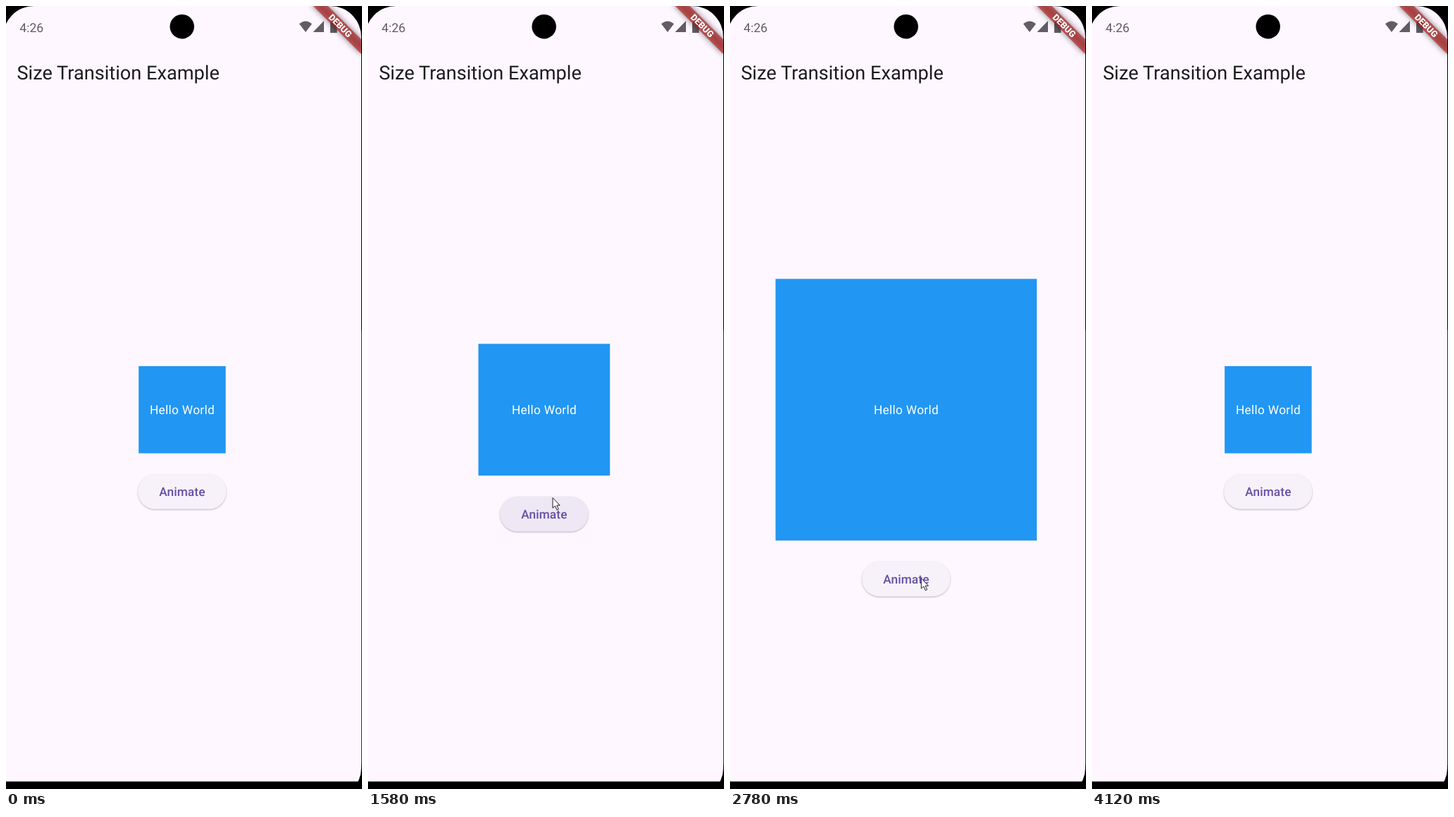
Recreate the animation shown at these times as an HTML page. Size 505 by 1109 pixels, loop 4.19 s.

```html
<!DOCTYPE html>
<html lang="en">
<head>
<meta charset="utf-8">
<title>Size transition</title>
<style>
  html, body { margin: 0; width: 100%; height: 100%; overflow: hidden; background: #000; }
  svg { display: block; width: 505px; height: 1109px; }
  text { font-family: Roboto, sans-serif; text-rendering: geometricPrecision; }
  .mid { text-anchor: middle; }
  .status { fill: #625d64; }
  .pill { x: 187.2px; y: -24.7px; width: 125.2px; height: 49.4px; rx: 24.7px; }
  .ribbon { x: -49.4px; y: 34.57px; width: 98.8px; height: 14.81px; }
  #face { filter: drop-shadow(0 1.3px 1px rgba(0, 0, 0, .27)); }
</style>
</head>
<body>
<svg viewBox="0 0 505 1109">
  <defs>
    <clipPath id="screen"><rect x="-4.2" width="508.2" height="1123" rx="44"/></clipPath>
    <filter id="soft" x="-30%" y="-200%" width="160%" height="500%"><feGaussianBlur stdDeviation="4.5"/></filter>
  </defs>
  <rect width="505" height="1109"/>
  <rect x="504" y="459" width="1" height="616" fill="#33292e"/>

  <g clip-path="url(#screen)">
    <rect x="-5" width="510" height="1109" fill="#fef7ff"/>
    <g class="status">
      <text x="19.3" y="36.5" font-size="17.6">4:26</text>
      <path d="M416 25.2Q425 17.6 434 25.2L425 37Z"/>
      <path d="M451 21V37H435.5Z"/>
      <path d="M460 22.5h2.8v-2h4v2h2.8V38H460Z"/>
    </g>
    <text x="15.5" y="103.5" font-size="27.16" fill="#1d1b20">Size Transition Example</text>

    <rect id="box" fill="#2196f3"/>
    <text class="mid" x="250" y="578" font-size="17.28" letter-spacing=".309" fill="#fff">Hello World</text>

    <g id="button">
      <rect id="face" class="pill" fill="#f7f2fa"/>
      <rect id="press" class="pill" fill="#6750a4"/>
      <text class="mid" x="249.9" y="6.2" font-size="17.28" font-weight="500" letter-spacing=".123" fill="#6750a4">Animate</text>
    </g>

    <g transform="translate(503.8 -1.8) rotate(45)">
      <rect class="ribbon" opacity=".5" filter="url(#soft)"/>
      <rect class="ribbon" fill="#b71c1c" fill-opacity=".627"/>
      <text class="mid" y="46.4" font-size="12.6" font-weight="900" fill="#fff">DEBUG</text>
    </g>
  </g>

  <circle cx="249.7" cy="29.2" r="17.2"/>
  <rect y="1098.4" width="505" height="11"/>
  <path id="cursor" d="M0 0V14.6L3.4 11.5L5.9 17.2L8.3 16.1L5.8 10.7H10.2Z" fill="#fff" stroke="#1b1b28"/>
</svg>

<script>
const LOOP = 4190, TICK = 66.5;
const CENTER_X = 249.9, CENTER_Y = 571.8, SMALL = 123.45, LARGE = 370.6;
const GROW = { start: 1208, duration: 1108 };
const SHRINK = { start: 3042, duration: 1000 };

const $ = id => document.getElementById(id);
const clamp = v => Math.min(1, Math.max(0, v));
const progress = (time, { start, duration }) => clamp((time - start) / duration);
const linear = p => p;
const easeOut = p => 1 - (1 - p) ** 2;

// cubic-bezier(.42, 0, .58, 1), solved by bisection
function easeInOut(x) {
  let lo = 0, hi = 1, s = .5;
  for (let i = 0; i < 20; i++) {
    s = (lo + hi) / 2;
    const bx = 1.26 * s * (1 - s) ** 2 + 1.74 * s * s * (1 - s) + s ** 3;
    if (bx < x) lo = s; else hi = s;
  }
  return s * s * (3 - 2 * s);
}

// The pointer comes in, nudges up to click, follows the button down, clicks and leaves.
const ENTRY = { x: 520, y: 1085 };
const MOVES = [
  { start: 0, duration: 600, dx: -255, dy: -377, ease: easeOut },
  { start: 670, duration: 460, dx: -3, dy: -11.5, ease: easeInOut },
  { start: 1650, duration: 250, dx: 4.5, dy: 3, ease: easeInOut },
  { start: 1740, duration: 800, dx: 4.8, dy: 111, ease: easeInOut },
  { start: 3120, duration: 250, dx: 245, dy: 302, ease: linear }
];

function pointerAt(time) {
  let { x, y } = ENTRY;
  for (const move of MOVES) {
    const p = move.ease(progress(time, move));
    x += move.dx * p;
    y += move.dy * p;
  }
  return [x, y];
}

// The highlight rises just before each transition and fades during it.
function highlight(time, { start }) {
  const t = time - start;
  return .062 * Math.min(clamp((t + 60) / 130), clamp((650 - t) / 230));
}

function setAttrs(el, attrs) {
  for (const name in attrs) el.setAttribute(name, attrs[name]);
}

function draw(time) {
  const grown = easeInOut(progress(time, GROW)) - easeInOut(progress(time, SHRINK));
  const size = SMALL + (LARGE - SMALL) * grown;
  setAttrs($('box'), { x: CENTER_X - size / 2, y: CENTER_Y - size / 2, width: size, height: size });
  setAttrs($('button'), { transform: `translate(0 ${CENTER_Y + size / 2 + 54.4})` });
  setAttrs($('press'), { opacity: highlight(time, GROW) + highlight(time, SHRINK) });
  setAttrs($('cursor'), { transform: `translate(${pointerAt(time)})` });
}

const begin = performance.now();
function loop() {
  const time = (performance.now() - begin) % LOOP;
  draw(Math.floor((time + 22) / TICK) * TICK);
  requestAnimationFrame(loop);
}
loop();
</script>
</body>
</html>
```
